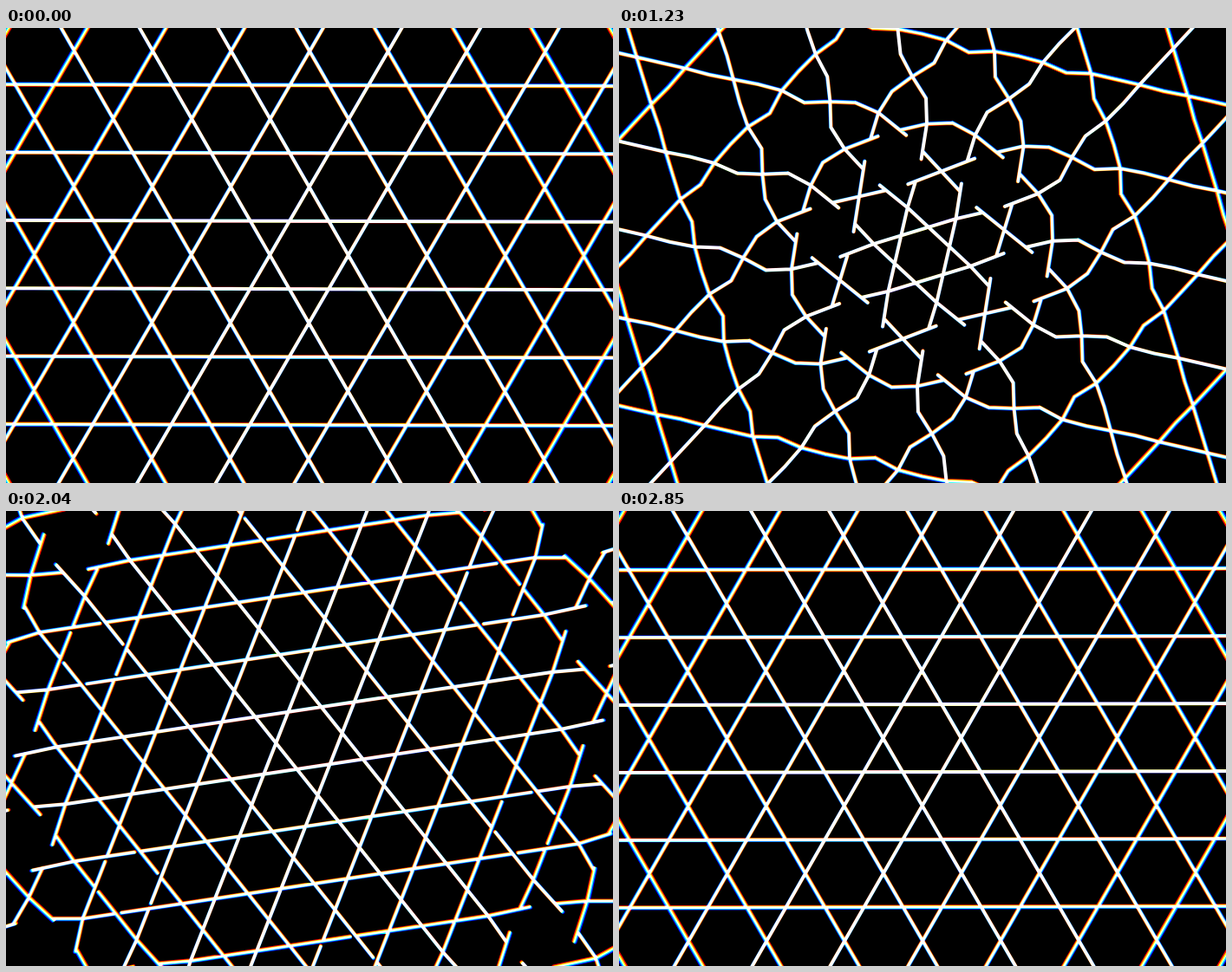
These frames come from a looping animation (700x525 px, 2.88 s). An HTML page with a canvas:

```html
<!DOCTYPE html>
<html lang="en">
<head>
<meta charset="utf-8">
<title>Kagome fold</title>
<style>
  html, body { margin: 0; width: 100%; height: 100%; overflow: hidden; background: #000; }
  canvas { display: block; width: 700px; height: 525px; }
</style>
</head>
<body>
<canvas id="stage" width="700" height="525"></canvas>
<script>
const W = 700, H = 525;
const CENTRE = [(W - 1) / 2, (H - 1) / 2];
const LOOP = 2880, STEP = 30;
const EDGE = 45.15;            // lattice edge in px at the start of the loop
const ROOT3 = Math.sqrt(3);
const DELAY = 150 / EDGE;      // ms per px of distance from the centre
const FOLD = { start: 85, span: 1040 };
const GROW = { start: 591, span: 782 };
const CHANNELS = [['#f00', 0.9965], ['#0f0', 1], ['#00f', 1.0035]];

const ctx = document.getElementById('stage').getContext('2d');

const polar = (r, deg) => {
  const a = deg * Math.PI / 180;
  return [r * Math.cos(a), r * Math.sin(a)];
};

function ease(time, { start, span }) {
  const u = Math.min(1, Math.max(0, (time - start) / span));
  return u * u * (3 - 2 * u);
}

// hexagon centres, in edge lengths
const cells = [];
for (let j = -7; j <= 7; j++) {
  for (let i = -10; i <= 10; i++) {
    const x = 2 * i + j, y = ROOT3 * j;
    if (Math.hypot(x, y) < 11.5) cells.push([x, y]);
  }
}

// Each side folds inwards at its middle; one half then grows past the fold.
function addCell(path, cx, cy, time, size, turn) {
  const foldRadius = ROOT3 / 2 - ease(time, FOLD) / (2 * ROOT3);
  const grow = ease(time, GROW) / ROOT3;
  const at = ([x, y]) => [cx + x * size, cy + y * size];
  for (let k = 0; k < 6; k++) {
    const a = turn + 60 * k;
    const from = polar(1, a), to = polar(1, a + 60);
    const mid = polar(foldRadius, a + 30);
    const dx = mid[0] - from[0], dy = mid[1] - from[1];
    const g = grow / Math.hypot(dx, dy);
    path.moveTo(...at(to));
    path.lineTo(...at(mid));
    path.moveTo(...at(from));
    path.lineTo(...at([mid[0] + dx * g, mid[1] + dy * g]));
  }
}

function draw(t) {
  const p = t / LOOP;
  const size = EDGE * Math.pow(ROOT3, p);
  const turn = 30 * p;
  const [c, s] = polar(1, turn);
  const path = new Path2D();
  for (const [x, y] of cells) {
    const cx = (x * c - y * s) * size, cy = (x * s + y * c) * size;
    const dist = Math.hypot(cx, cy);
    if (dist < W / 1.6 + 2 * size) addCell(path, cx, cy, t - dist * DELAY, size, turn);
  }

  ctx.setTransform(1, 0, 0, 1, 0, 0);
  ctx.globalCompositeOperation = 'source-over';
  ctx.fillStyle = '#000';
  ctx.fillRect(0, 0, W, H);
  ctx.globalCompositeOperation = 'lighter';
  ctx.lineWidth = 4;
  ctx.lineCap = 'round';
  for (const [color, zoom] of CHANNELS) {
    ctx.setTransform(zoom, 0, 0, zoom, ...CENTRE);
    ctx.strokeStyle = color;
    ctx.stroke(path);
  }
}

const begin = performance.now();
function tick() {
  const t = (performance.now() - begin) % LOOP;
  draw((Math.floor(t / STEP) + 0.5) * STEP);   // pose at the middle of each step
  requestAnimationFrame(tick);
}
tick();
</script>
</body>
</html>
```
